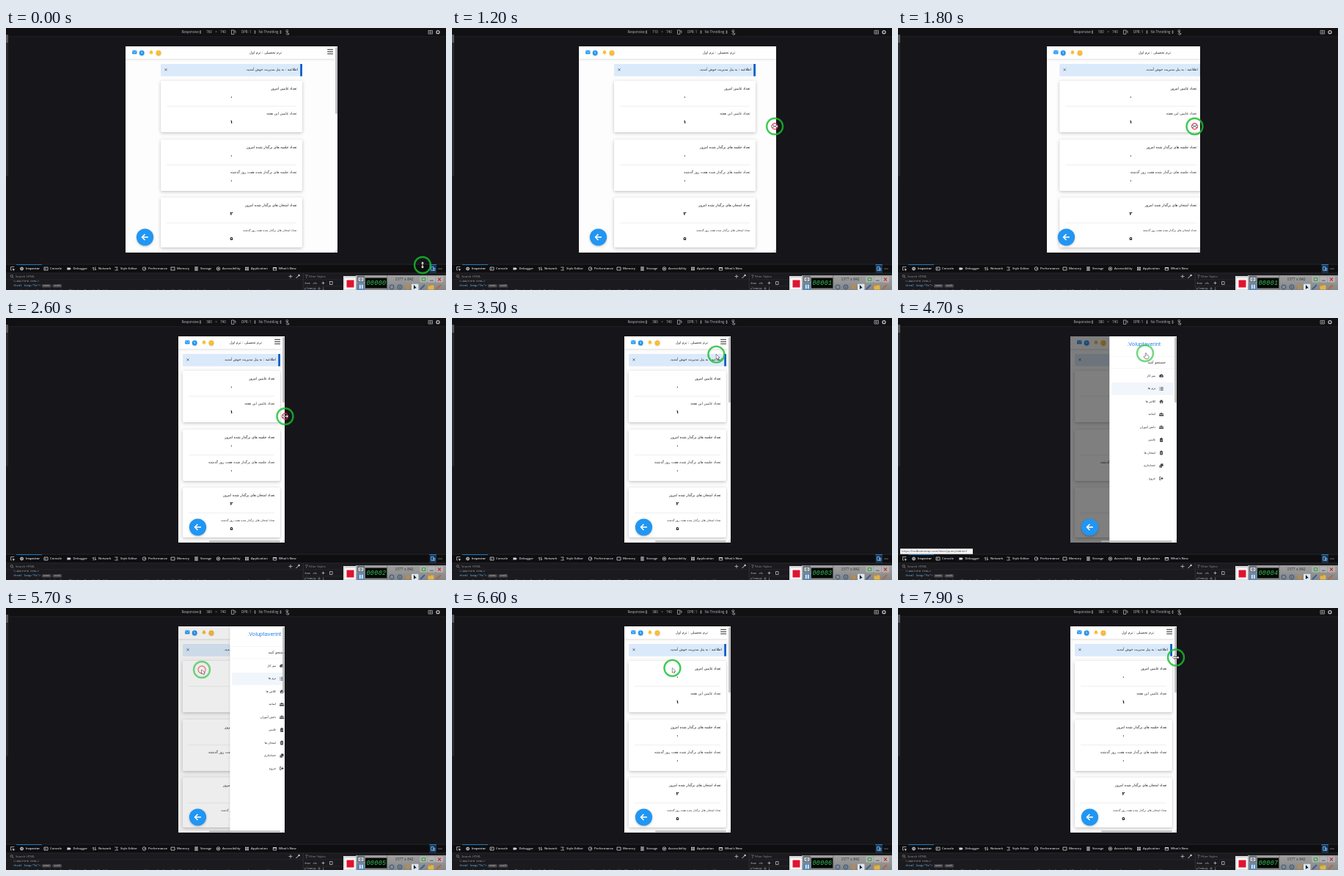
Write an HTML page with a canvas that moves like this. It is 600x357 px and loops after 8000 ms.

```html
<!DOCTYPE html>
<html lang="en">
<head>
<meta charset="utf-8">
<title>Responsive panel</title>
<style>
html, body { margin: 0; width: 100%; height: 100%; overflow: hidden; background: #16151a; }
canvas { display: block; width: 600px; height: 357px; }
</style>
</head>
<body>
<canvas id="stage"></canvas>
<script>
const W = 600, H = 357, LOOP = 8000, STEP = 100;
const canvas = document.getElementById('stage');
const g = canvas.getContext('2d');
const dpr = window.devicePixelRatio || 1;
canvas.width = W * dpr;
canvas.height = H * dpr;

const UI = '"Open Sans", "Noto Sans", sans-serif';
const MONO = '"Liberation Mono", "DejaVu Sans Mono", monospace';
const FA = '"DejaVu Sans", "Noto Sans", sans-serif';
const TOP = 25, BOTTOM = 306, BLUE = '#2196f3';

// ---------- helpers ----------
function at(t, keys) {
  if (t <= keys[0][0]) return keys[0].slice(1);
  for (let i = 1; i < keys.length; i++) {
    const a = keys[i - 1], b = keys[i];
    if (t <= b[0]) {
      const k = (t - a[0]) / (b[0] - a[0]);
      return a.slice(1).map((v, j) => v + (b[j + 1] - v) * k);
    }
  }
  return keys[keys.length - 1].slice(1);
}
const within = (t, a, b) => t >= a && t < b;

function rect(x, y, w, h, fill) {
  g.fillStyle = fill;
  g.fillRect(x, y, w, h);
}
function round(x, y, w, h, r, fill) {
  g.fillStyle = fill;
  g.beginPath();
  g.roundRect(x, y, w, h, r);
  g.fill();
}
function box(x, y, w, h, color, lw = 0.8) {
  g.strokeStyle = color;
  g.lineWidth = lw;
  g.strokeRect(x, y, w, h);
}
function disc(x, y, r, fill) {
  g.fillStyle = fill;
  g.beginPath();
  g.arc(x, y, r, 0, 7);
  g.fill();
}
function ring(x, y, r, color, lw) {
  g.strokeStyle = color;
  g.lineWidth = lw;
  g.beginPath();
  g.arc(x, y, r, 0, 7);
  g.stroke();
}
function trace(pts, dx, dy) {
  g.beginPath();
  for (let i = 0; i < pts.length; i += 2) g.lineTo(pts[i] + dx, pts[i + 1] + dy);
}
function line(pts, color, lw = 0.8, dx = 0, dy = 0) {
  g.strokeStyle = color;
  g.lineWidth = lw;
  trace(pts, dx, dy);
  g.stroke();
}
function poly(pts, color, dx = 0, dy = 0) {
  g.fillStyle = color;
  trace(pts, dx, dy);
  g.fill();
}
function text(s, x, y, size, color, font = UI, align = 'left', weight = 400) {
  g.font = `${weight} ${size}px ${font}`;
  g.textAlign = align;
  g.textBaseline = 'middle';
  g.direction = 'ltr';
  g.fillStyle = color;
  g.fillText(s, x, y);
}
function persian(s, x, y, size, color, align = 'right', weight = 400) {
  g.font = `${weight} ${size}px ${FA}`;
  g.textAlign = align;
  g.textBaseline = 'middle';
  g.direction = 'rtl';
  g.fillStyle = color;
  g.fillText(s, x, y);
}
function withShadow(color, blur, dy, draw) {
  g.save();
  g.shadowColor = color;
  g.shadowBlur = blur * dpr;
  g.shadowOffsetY = dy * dpr;
  draw();
  g.restore();
}
function updown(x, y, color) {
  poly([-1.3, -0.6, 0, -2.3, 1.3, -0.6], color, x, y);
  poly([-1.3, 0.6, 0, 2.3, 1.3, 0.6], color, x, y);
}

// ---------- browser frame ----------
function topBar(cssWidth) {
  rect(0, 0, W, H, '#16151a');
  rect(0, 0, W, 11.5, '#111114');
  rect(0, 11.5, W, 0.6, '#26262a');
  rect(0, 9, 3, 11, '#55555a');
  rect(0, 20, 3, 182, '#29292d');
  rect(0, 202, 3, 120, '#19191d');
  const c = '#c0c0c4';
  text('Responsive', 239.5, 5.5, 4.4, c);
  updown(265, 5.5, c);
  text(cssWidth, 277, 5.5, 4.4, c, UI, 'center');
  text('×', 286.5, 5.5, 4.6, '#8c8c90', UI, 'center');
  text('740', 296, 5.5, 4.4, c, UI, 'center');
  box(307.5, 3, 3.4, 5.4, c, 0.7);
  line([311.5, 4, 313, 4, 313, 7], c, 0.7);
  text('DPR: 1', 321, 5.5, 4.4, c);
  updown(339.5, 5.5, c);
  text('No Throttling', 344.5, 5.5, 4.4, c);
  updown(374.5, 5.5, c);
  ring(383.3, 4, 1.5, c, 0.6);
  line([383.3, 4, 383.3, 7, 385.8, 7.2, 385.4, 9, 383, 9, 381.8, 7.4], c, 0.7);
  box(576, 3.4, 5.5, 4.6, c, 0.7);
  ring(578.7, 5.7, 1.1, c, 0.7);
  ring(589, 5.7, 2, c, 1.3);
}

const TABS = [['Inspector', 27], ['Console', 60], ['Debugger', 91.5], ['Network', 126],
  ['Style Editor', 156], ['Performance', 194], ['Memory', 233], ['Storage', 265],
  ['Accessibility', 295], ['Application', 334], ['What\u2019s New', 372]];

function tabIcon(i, x, y, c) {
  if (i === 0) { ring(x, y, 1.9, c, 1); disc(x, y, 0.8, c); }
  if (i === 1 || i === 6) box(x - 2.5, y - 2, 5, 4, c);
  if (i === 1) line([-1.4, -1, 0, 0, -1.4, 1], c, 0.6, x, y);
  if (i === 2) poly([-2.6, -1.6, 1, -1.6, 2.8, 0, 1, 1.6, -2.6, 1.6], c, x, y);
  if (i === 3) {
    line([-1.2, 2.4, -1.2, -2, -2.6, -0.5], c, 0.8, x, y);
    line([1.2, -2.4, 1.2, 2, 2.6, 0.5], c, 0.8, x, y);
  }
  if (i === 4) line([-2.2, -2, 1.8, -2, 0.3, 0, 2, 2, -2.2, 2], c, 0.7, x, y);
  if (i === 5 || i === 8) ring(x, y, 2.3, c, 0.8);
  if (i === 5) line([0, 0.8, 1.3, -1], c, 0.8, x, y);
  if (i === 7) for (let k = -2; k <= 2; k += 2) rect(x - 2.3, y + k - 0.6, 4.6, 1.2, c);
  if (i === 8) disc(x, y, 1, c);
  if (i === 9) for (let k = 0; k < 4; k++) rect(x - 2.3 + (k % 2) * 2.6, y - 2.3 + (k >> 1) * 2.6, 2, 2, c);
  if (i === 10) { box(x - 2.2, y - 1, 4.4, 3, c); rect(x - 2.6, y - 2, 5.2, 1.2, c); }
}

function devtools() {
  rect(0, 322, W, 35, '#1b1b1f');
  rect(0, 322, W, 12, '#0e0e10');
  rect(0, 321.7, W, 0.7, '#2e2e32');
  rect(14, 322, 35, 0.9, '#1b7fd0');
  rect(0, 333.6, W, 0.6, '#343438');
  const c = '#d2d2d6';
  line([11, 326, 11, 325.5, 6.5, 325.5, 6.5, 330, 8, 330], c, 0.7);
  poly([0, 0, 4, 1.6, 2.2, 2.2, 1.6, 4], c, 8.6, 327.4);
  TABS.forEach(([name, x], i) => {
    const color = i ? c : '#f4f4f8';
    tabIcon(i, x - 5.5, 328, color);
    text(name, x, 328, 4.2, color, UI, 'left', 600);
  });
  rect(577.5, 322, 9.5, 12, '#1d3048');
  rect(577.5, 322, 9.5, 0.9, '#1b8fe8');
  box(579.7, 325.3, 3.2, 5, '#75bfff', 0.9);
  box(582.7, 327.3, 2.2, 3, '#75bfff', 0.9);
  for (let k = 0; k < 3; k++) disc(590 + k * 2, 328, 0.6, c);

  const dim = '#8f8f96';
  ring(7.7, 338, 1.6, dim, 0.7);
  line([8.8, 339.2, 10.4, 341], dim, 0.7);
  text('Search HTML', 13, 338.6, 4.3, dim);
  rect(0, 342.6, 405, 0.5, '#303034');
  line([385.5, 338.5, 390.5, 338.5], c, 0.7);
  line([388, 336, 388, 341], c, 0.7);
  line([395.5, 341, 399, 337.5], c, 1);
  disc(399.6, 337, 1.2, c);
  text('<!DOCTYPE HTML>', 10, 345.4, 3.9, '#a8a8ae', MONO);
  text('<html lang="fa">', 10, 351.2, 3.9, '#75bfff', MONO);
  [['event', 49], ['scroll', 63.5]].forEach(([s, x]) => {
    round(x, 349.2, 12.5, 4.2, 1, '#48484e');
    text(s, x + 6.2, 351.2, 3.3, '#c4c4ca', UI, 'center');
  });
  text('▸ <head> ⋯ </head> <body class="fixed-sn" style="padding: 0; transition: padding; display: block"> ⋯ body { color: #212529; }', 13, 357.6, 3.9, '#9fb6cf', MONO);
  text(':root { --main-padding: 16px; --main-color: blue; }', 315, 357.6, 3.9, '#75bfff', MONO);

  rect(404.8, 334, 0.7, 23, '#39393d');
  line([408, 336.8, 411.4, 336.8, 409.7, 339, 409.7, 341], dim, 0.6);
  text('Filter Styles', 413, 338.6, 4.3, dim);
  rect(405, 342.6, 195, 0.5, '#303034');
  text(':hov', 407, 347.5, 4.1, c);
  text('.cls', 418, 347.5, 4.1, c);
  line([430.5, 347.5, 434.5, 347.5], c, 0.7);
  line([432.5, 345.5, 432.5, 349.5], c, 0.7);
  box(441.5, 345.5, 3.6, 4, c, 0.7);
  rect(405, 351.6, 60, 0.5, '#303034');
  text('element', 407, 355, 3.9, '#b8b8be', MONO);
  ring(427, 355, 1.2, dim, 0.7);
  text('{', 431.5, 355, 3.9, '#b8b8be', MONO);
}

function recorder(t) {
  const p = g.createLinearGradient(0, 336, 0, 357);
  p.addColorStop(0, '#a2a2a2');
  p.addColorStop(1, '#868686');
  rect(477, 337, 123, 20, p);
  rect(460, 338, 17.5, 19, '#dcdcdc');
  rect(462, 341, 14.5, 15, '#fafafa');
  rect(464.5, 343.5, 10, 10, '#e01430');
  round(478.8, 337.5, 10.5, 9, 1, '#66707a');
  round(480.5, 340, 7, 5, 1, '#d4d8dc');
  ring(484, 342.5, 1.4, '#3a4650', 0.9);
  round(478.8, 347.5, 10.5, 9.5, 1, '#5b87b2');
  rect(482, 349.8, 1.6, 5.4, '#f4f4f4');
  rect(485, 349.8, 1.6, 5.4, '#f4f4f4');
  rect(490, 340.5, 29.5, 14, '#050805');
  const digits = String(Math.max(0, Math.floor((t - 200) / 1000))).padStart(5, '0');
  for (let i = 0; i < 5; i++) text(digits[i], 494 + i * 5.4, 347.6, 8.5, '#37c55a', MONO, 'center', 'italic');
  rect(519.5, 337, 0.7, 20, '#666');
  text('1577 x 842', 543, 343, 5.6, '#2c2c2c', '"Liberation Serif", serif', 'center');
  for (let k = 0; k < 3; k++) round(564.5 + k * 10.8, 338.5, 10, 8, 1, '#b4b4b4');
  box(567.3, 340.5, 4.4, 3.8, '#38a548', 1.2);
  rect(577.8, 343.6, 5, 1.2, '#666');
  line([589, 340.4, 593, 344.6], '#cc2f2f', 1.3);
  line([589, 344.6, 593, 340.4], '#cc2f2f', 1.3);
  ring(526, 353, 2.8, '#3d648c', 1.2);
  ring(537, 353, 2.8, '#3f5f7e', 1.2);
  disc(537, 353, 1, '#3f5f7e');
  round(544.5, 350, 6, 6, 3, '#b98a4c');
  round(553, 348.7, 9.5, 8.3, 1, '#dce6f0');
  poly([0, 0, 0, 6, 1.6, 4.6, 3.8, 4.2], '#111', 556, 350);
  line([565, 356, 571, 350], '#3a5f96', 1.8);
  round(575.5, 350.5, 8, 6, 1, '#e0b448');
  rect(575.5, 349.5, 4, 2, '#c49028');
  line([587, 356, 593, 350], '#b4653f', 1.8);
}

// ---------- page ----------
const CARDS = [
  [72, 'تعداد غایبین امروز', '۰', 'تعداد غایبین این هفته', '۱', 4.8],
  [152, 'تعداد جلسه های برگذار شده امروز', '۰', 'تعداد جلسه های برگذار شده هفت روز گذشته', '۰', 4.8],
  [231, 'تعداد امتحان های برگذار شده امروز', '۲', 'تعداد امتحان های برگذار شده هفت روز گذشته', '۵', 3.8]
];

function envelope(x, y) {
  round(x - 3.2, y - 2.4, 6.4, 4.8, 0.7, BLUE);
  line([-3, -1.6, 0, 0.6, 3, -1.6], '#fff', 0.6, x, y);
}
function bell(x, y) {
  g.fillStyle = '#fbbb2c';
  g.beginPath();
  g.arc(x, y - 0.6, 1.9, Math.PI, 0);
  g.lineTo(x + 2.7, y + 1.8);
  g.lineTo(x - 2.7, y + 1.8);
  g.fill();
  disc(x, y + 2.3, 0.8, '#fbbb2c');
}
function badge(x, y, color, n) {
  withShadow('rgba(0,0,0,.25)', 1.5, 0.6, () => disc(x, y, 3.4, color));
  persian(n, x, y, 4.4, '#fff', 'center', 700);
}

// lw is the laid out width, which may lag behind the visible one
function page(L, w, lw) {
  const [m] = at(lw, [[145, 6], [229, 17.3], [289, 48]]);
  const [titleX] = at(lw, [[145, 114], [229, 169], [289, 213]]);
  const left = L + m, right = L + lw - m, mid = L + lw / 2;
  rect(L, TOP, w, BOTTOM - TOP, '#fdfdfd');
  withShadow('rgba(0,0,0,.16)', 3, 0.8, () => rect(L - 5, TOP - 5, lw + 10, 22, '#fff'));
  envelope(L + 12.3, 33);
  badge(L + 22.2, 34, BLUE, '۱');
  bell(L + 35, 33);
  badge(L + 45, 34, '#fbbb2c', '۰');
  persian('ترم تحصیلی : ترم اول', L + titleX, 33.6, 4.75, '#222');
  for (let k = 0; k < 3; k++) rect(L + lw - 13.8, 28.8 + k * 2.9, 7.8, 1.1, '#3c3c3c');

  round(left, 49, right - left, 16.7, 1.2, '#dbeafa');
  rect(right - 2.8, 49, 2.8, 16.7, '#0b5ec7');
  persian('اطلاعیه : به پنل مدیریت خوش آمدید.', right - 6, 57, 4.6, '#161d26');
  line([-1.5, -1.5, 1.5, 1.5], '#4a545e', 0.8, left + 7, 56.8);
  line([-1.5, 1.5, 1.5, -1.5], '#4a545e', 0.8, left + 7, 56.8);

  for (const [y, title, a, sub, b, size] of CARDS) {
    const h = y > 200 ? 68 : 70;
    withShadow('rgba(0,0,0,.24)', 4, 1.2, () => round(left, y, right - left, h, 1.8, '#fff'));
    persian(title, right - 7.5, y + 11, 4.75, '#111');
    persian(a, mid, y + 22.8, 6.4, '#111', 'center', 700);
    rect(left + 8, y + 34.6, right - left - 16, 0.5, '#dcdcdc');
    persian(sub, right - 7.5, y + 44.8, size, '#333');
    persian(b, mid, y + 56, 6.4, '#111', 'center', 700);
  }
}

function fab(L) {
  const x = L + 26.5, y = 285;
  withShadow('rgba(0,0,0,.25)', 3, 1, () => disc(x, y, 11.6, BLUE));
  line([0, -4, -4, 0, 0, 4], '#fff', 1.6, x, y);
  line([-4, 0, 4.4, 0], '#fff', 1.6, x, y);
}

const MENU = ['میز کار', 'ترم ها', 'کلاس ها', 'اساتید', 'دانش آموزان', 'غایبین', 'امتحان ها', 'حسابداری', 'خروج'];

function menuIcon(i, x, y) {
  const c = '#454545';
  if (i === 0) {
    g.fillStyle = c;
    g.beginPath();
    g.arc(x, y + 0.5, 2.8, Math.PI * 0.85, Math.PI * 0.15);
    g.fill();
    line([0, 1, 1, -1], '#fff', 0.6, x, y);
  } else if (i === 1) {
    for (let k = -1.8; k <= 1.8; k += 1.8) {
      rect(x - 2.6, y + k - 0.4, 0.9, 0.9, c);
      rect(x - 1, y + k - 0.4, 3.6, 0.9, c);
    }
  } else if (i === 2) {
    poly([-3, 0.2, 0, -2.6, 3, 0.2], c, x, y);
    rect(x - 2, y, 1.5, 2.4, c);
    rect(x + 0.5, y, 1.5, 2.4, c);
  } else if (i < 5) {
    for (let k = -2; k <= 2; k += 2) {
      disc(x + k, y - (k ? 0.7 : 1.2), k ? 0.8 : 1.2, c);
      round(x + k - 1.2, y + 0.4, 2.4, 1.9, 0.8, c);
    }
  } else if (i < 7) {
    round(x - 2, y - 2.3, 4, 5, 0.6, c);
    rect(x - 1, y - 3, 2, 1, c);
    if (i === 5) line([-1, 0.4, -0.2, 1.2, 1.2, -0.6], '#fff', 0.6, x, y);
    else for (let k = 0; k < 2; k++) rect(x - 1.2, y - 0.6 + k * 1.5, 2.4, 0.5, '#fff');
  } else if (i === 7) {
    round(x - 1, y - 2.6, 3.5, 3.4, 0.5, c);
    round(x - 2.6, y - 0.6, 3.5, 3.2, 0.5, c);
    rect(x - 1.8, y + 0.6, 2, 0.5, '#fff');
  } else {
    line([-0.6, -2, -2.4, -2, -2.4, 2, -0.6, 2], c, 0.8, x, y);
    poly([-1.2, -0.6, 0.6, -0.6, 0.6, -1.9, 2.7, 0, 0.6, 1.9, 0.6, 0.6, -1.2, 0.6], c, x, y);
  }
}

function drawer(shift) {
  const x = 288.3 + shift;
  withShadow('rgba(0,0,0,.2)', 3, 1, () => rect(x, TOP, 110, BOTTOM - TOP, '#fff'));
  text('.Voluptaverint', x + 47, 36, 7.5, '#2a84e6', 'Roboto, sans-serif', 'center');
  rect(x, 52, 92, 0.5, '#ececec');
  persian('جستجو کنید', x + 76.7, 60.8, 5, '#333');
  rect(x, 68.6, 92, 0.5, '#ececec');
  rect(x + 3, 88, 84, 17, '#f0f6fb');
  MENU.forEach((s, i) => {
    const y = 79 + i * 17.45;
    persian(s, x + 62.8, y, 3.95, '#222');
    menuIcon(i, x + 70.8, y);
  });
}

function track(R) {
  rect(R - 4.3, TOP, 4.3, BOTTOM - TOP, '#fff');
}
function thumbs(R, narrow) {
  round(R - 2.7, 26, 2.3, narrow ? 89.5 : 91, 1, '#b4b4b4');
  if (narrow) round(277, 303.4, 97, 1.8, 0.9, '#b0b0b0');
}

// ---------- pointer ----------
const PATH = [[0, 568, 323], [100, 568, 323], [500, 495, 190], [900, 453, 135], [1000, 452, 134],
  [1800, 404.5, 134], [2400, 380.5, 134], [2700, 380.5, 134], [3100, 330, 92], [3600, 368, 39],
  [4000, 373, 34], [4200, 373, 34], [4500, 342, 46], [4700, 337, 48], [5000, 318, 64],
  [5500, 267, 84], [6300, 267, 84], [7000, 345, 79], [7200, 345, 79], [7800, 379, 67.5], [7900, 379, 67.5]];
const GLOW = [[4200, 0.82], [4700, 0.6], [5700, 0.6], [6300, 0.82]];

function pointerKind(t) {
  if (t < 200) return 'vertical';
  if (within(t, 900, 2800) || t >= 7700) return 'horizontal';
  if (within(t, 3600, 5000)) return 'hand';
  return 'arrow';
}

function shape(pts, x, y) {
  g.lineJoin = 'round';
  trace(pts, x, y);
  g.closePath();
  g.fillStyle = '#fff';
  g.strokeStyle = '#111';
  g.lineWidth = 0.9;
  g.stroke();
  g.fill();
}

function pointer(t) {
  const [x, y] = at(t, PATH), [glow] = at(t, GLOW), kind = pointerKind(t);
  ring(x, y, 11, `rgba(22,190,46,${glow})`, 2.4);
  if (within(t, 1000, 2700) || within(t, 4000, 4200) || within(t, 5600, 5800)) {
    ring(x, y, kind === 'horizontal' ? 4 : 5, `rgba(236,44,72,${glow})`, 1.4);
  }
  if (kind === 'arrow') shape([0, 0, 0, 6, 1.4, 4.8, 2.4, 6.8, 3.3, 6.3, 2.4, 4.4, 4.2, 4.2], x, y);
  else if (kind === 'hand') {
    shape([-0.6, 0, 0.5, 0, 0.7, 2.6, 3.6, 3.3, 3.8, 5.6, 2.8, 7.6, -0.6, 7.6, -2.6, 4.6, -1.8, 4, -0.6, 5], x + 1, y);
  } else {
    const arrows = [-4.4, 0, -2.2, -2, -2.2, -0.5, 2.2, -0.5, 2.2, -2, 4.4, 0, 2.2, 2, 2.2, 0.5, -2.2, 0.5, -2.2, 2];
    g.save();
    g.translate(x, y);
    if (kind === 'vertical') g.rotate(Math.PI / 2);
    shape(arrows, 0, 0);
    g.restore();
  }
}

function status(t) {
  let s = '', w = 0;
  if (within(t, 3800, 4400)) { s = '127.0.0.1:8000/agent/school/1/dashboard#'; w = 91; }
  else if (within(t, 4500, 5000)) { s = 'https://mdbootstrap.com/docs/jquery/admin/'; w = 99; }
  if (!s) return;
  rect(3, 314.3, w, 7.7, '#f6f6f6');
  text(s, 5, 318.2, 4.2, '#4a4a4a');
}

// ---------- scene ----------
const SIZE = [[1000, 289], [1800, 209], [2400, 145]];
const DIM = [[4000, 0], [4100, 0.2], [4200, 0.38], [4300, 0.5], [5500, 0.5], [5600, 0.28], [5700, 0.07], [5800, 0]];
const SLIDE = [[4100, 98], [4200, 68], [4300, 30], [4400, 8], [4500, 0], [5600, 0], [5700, 17], [5800, 50], [5900, 80], [6000, 98]];

function draw(t) {
  g.setTransform(dpr, 0, 0, dpr, 0, 0);
  const [w] = at(t, SIZE), [lw] = at(t - 200, SIZE);
  const [dim] = at(t, DIM), [slide] = at(t, SLIDE);
  const L = 307.5 - w / 2, settled = lw - w < 1;
  topBar(String(Math.round(w / 0.38 / 10) * 10));
  g.save();
  g.beginPath();
  g.rect(L, TOP, w, BOTTOM - TOP);
  g.clip();
  page(L, w, lw);
  if (dim) rect(L, TOP, w, BOTTOM - TOP, `rgba(0,0,0,${dim})`);
  fab(L);
  if (settled) track(L + w);
  if (slide < 98) drawer(slide);
  if (settled) thumbs(L + w, w < 200);
  for (let k = 1; k < 4; k++) line([L + w - k * 1.3, 305.6, L + w - 0.3, 305.6 - k * 1.3], '#888', 0.4);
  g.restore();
  status(t);
  devtools();
  recorder(t);
  pointer(t);
}

function tick(now) {
  draw(Math.floor((now % LOOP) / STEP) * STEP);
  requestAnimationFrame(tick);
}
draw(0);
requestAnimationFrame(tick);
</script>
</body>
</html>
```
